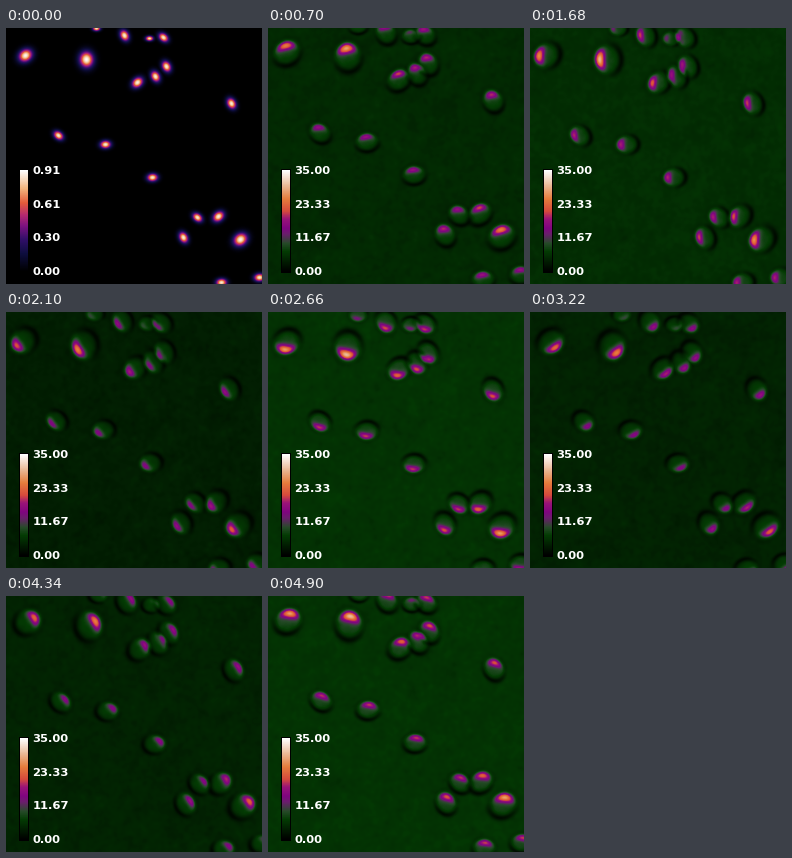
Recreate the animation shown at these times as a matplotlib script. Size 256 by 256 pixels, loop 5040 ms.

```python
import numpy as np
import matplotlib.pyplot as plt
from matplotlib.animation import FuncAnimation
from matplotlib.colors import LinearSegmentedColormap

SIZE, DPI = 256, 100
HOLD, STEPS, STEP_MS = 4, 32, 140
BAR_TOP, BAR_HEIGHT = 142, 102

# radius, tilt in degrees (y down), centres
GROUPS = [
    (10.5, 85, [(80, 31)]),
    (9.5, -35, [(19, 27), (234, 211)]),
    (8, -40, [(131, 54), (212, 188)]),
    (7.5, 62, [(118, 7), (149, 48), (160, 38), (225, 75), (177, 209)]),
    (7, 38, [(157, 9), (52, 107), (191, 189)]),
    (7, -3, [(99, 116), (146, 149), (215, 254), (253, 249)]),
    (5, 0, [(143, 10), (90, 0)]),
]
CELLS = [(x, y, radius, tilt) for radius, tilt, spots in GROUPS for x, y in spots]

HEAT = LinearSegmentedColormap.from_list("heat", [
    (0, "#000000"), (.18, "#0e0e40"), (.32, "#320f69"), (.45, "#7c1280"),
    (.56, "#b62a70"), (.68, "#e45c3a"), (.82, "#f2b47c"), (1, "#ffffff")])
FIELD = LinearSegmentedColormap.from_list("field", [
    (0, "#000000"), (.2, "#043c04"), (.28, "#284b2a"), (.37, "#6a1e6c"),
    (.43, "#800580"), (.52, "#9a1478"), (.6, "#d74b3c"), (.72, "#e67d3c"),
    (.85, "#ebb996"), (1, "#ffffff")])

Y, X = np.mgrid[0:SIZE, 0:SIZE] + .0


def smooth_noise(rng, width):
    f = np.fft.fftfreq(SIZE)
    r2 = f[:, None] ** 2 + f[None, :] ** 2
    spectrum = np.fft.fft2(rng.standard_normal((SIZE, SIZE)))
    noise = np.fft.ifft2(spectrum * np.exp(-2 * (np.pi * width) ** 2 * r2)).real
    return noise / noise.std()


def local(x, y, radius, tilt, grow=0):
    """Coordinates in units of the half axes of a tilted ellipse."""
    c, s = np.cos(np.radians(tilt)), np.sin(np.radians(tilt))
    dx, dy = X - x, Y - y
    short = radius * (.45 + .04 * radius)
    return (dx * c + dy * s) / (radius + grow), (dy * c - dx * s) / (short + grow)


rng = np.random.default_rng(7)
GRAIN = [.004 * smooth_noise(rng, 6) + .005 * smooth_noise(rng, 1.8)
         for _ in range(2)]


def intensity():
    level = np.zeros((SIZE, SIZE))
    for x, y, radius, tilt in CELLS:
        e, f = local(x, y, radius, tilt)
        peak = min(1, .86 + .012 * radius)
        level = np.maximum(level, peak * np.exp(-1.7 * (e * e + f * f)))
    return level


def response(step):
    angle = np.pi / 2 + 2 * np.pi * step / STEPS
    dx, dy = np.cos(angle), -np.sin(angle)
    pulse = np.cos(8 * np.pi * (step - 15) / STEPS)
    level = .14 + .03 * pulse + .01 * dx + dx * GRAIN[0] + dy * GRAIN[1]
    lit = np.zeros_like(level)
    for x, y, radius, tilt in CELLS:
        shift = 1.5 + .2 * radius
        e, f = local(x + shift * dx, y + shift * dy, radius, tilt, grow=4)
        turn = angle + np.radians(tilt)
        c, s = np.cos(turn), -np.sin(turn)
        u, v = e * c + f * s, f * c - e * s
        r = np.hypot(u, v)
        peak = (.08 * radius - .12) * (1 + .06 * pulse)
        disk = np.exp(-1.2 * r ** 4)
        crest = np.exp(-((u - .6 + .25 * v * v) / .38) ** 2 - (v / .75) ** 2)
        lit = np.maximum(lit, disk * (.085 + .04 * u + 1.15 * (peak - .17) * crest))
        away = np.clip(-u / (r + .01), 0, 1)
        level *= 1 - (.2 + .6 * away) * np.exp(-((r - 1.1) / .25) ** 2)
    return np.clip(level + lit, 0, 1)


def render(level, cmap):
    rgb = cmap(level)[..., :3]
    bottom = BAR_TOP + BAR_HEIGHT
    rgb[BAR_TOP - 1:bottom + 1, 13:23] = 0
    ramp = cmap(np.linspace(1, 0, BAR_HEIGHT))[:, None, :3]
    rgb[BAR_TOP:bottom, 14:22] = ramp
    return rgb


fig = plt.figure(figsize=(SIZE / DPI, SIZE / DPI), dpi=DPI, facecolor="black")
ax = fig.add_axes([0, 0, 1, 1])
ax.set_axis_off()
image = ax.imshow(np.zeros((SIZE, SIZE, 3)), extent=(0, SIZE, SIZE, 0),
                  interpolation="nearest", aspect="auto")
labels = [ax.text(26.3, 146 + k * 101 / 3, "", color="white",
                  family="DejaVu Sans", weight="bold", size=8.25, va="baseline")
          for k in range(4)]


def draw(n):
    if n < HOLD:
        top = .91
        image.set_data(render(intensity(), HEAT))
    else:
        top = 35
        image.set_data(render(response(n - HOLD), FIELD))
    for k, label in enumerate(labels):
        label.set_text(f"{top * (3 - k) / 3:.2f}")
    return [image, *labels]


anim = FuncAnimation(fig, draw, frames=HOLD + STEPS, interval=STEP_MS,
                     repeat=True, repeat_delay=0, blit=False)
plt.show()
```
